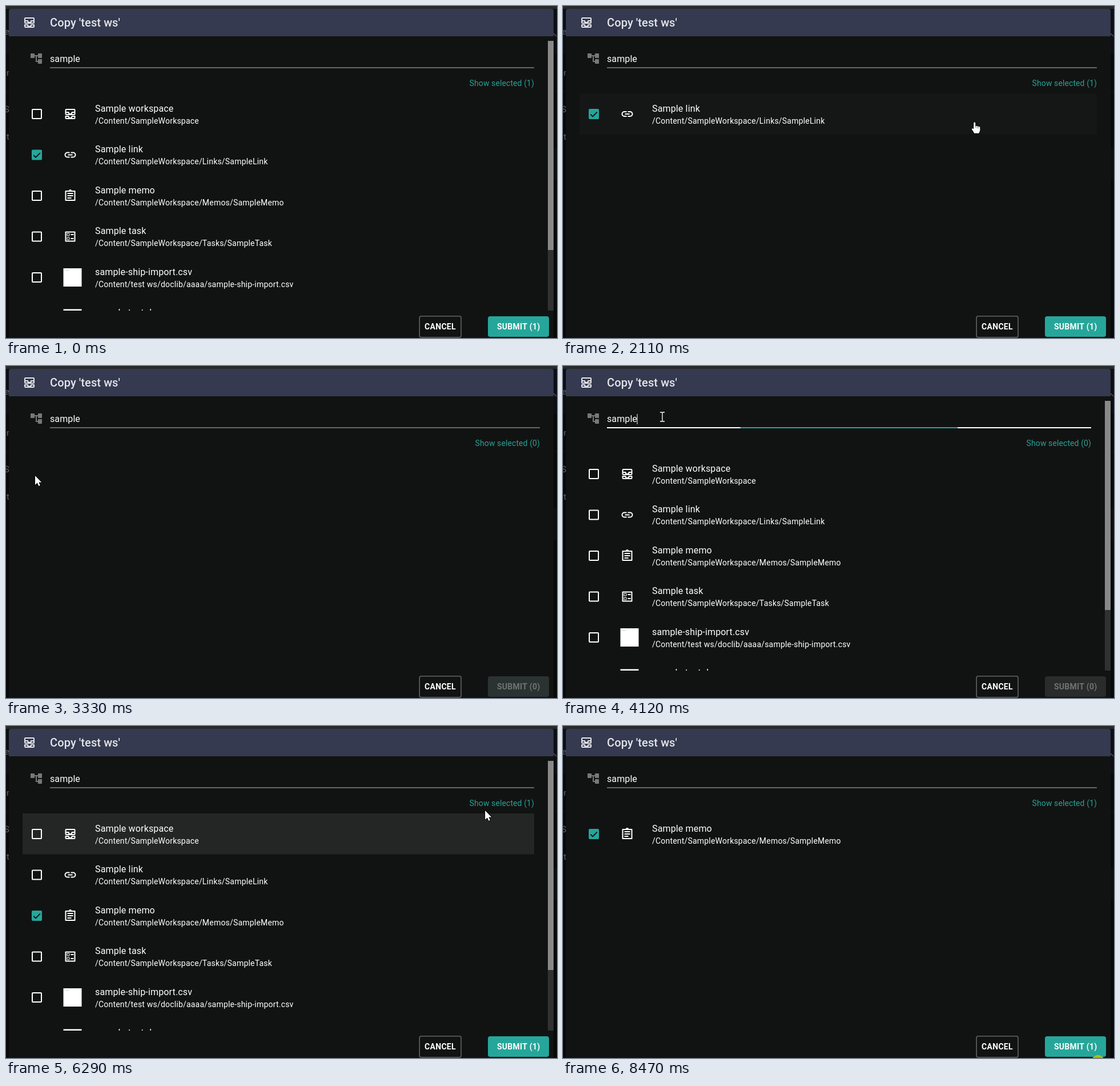
Recreate the animation shown at these times as an HTML page with a canvas. Size 965 px wide and 581 px high, loop 8540 ms.

```html
<!DOCTYPE html>
<html lang="en">
<head>
<meta charset="utf-8">
<title>Copy dialog</title>
<style>
html, body { margin: 0; width: 100%; height: 100%; overflow: hidden; background: #080909; }
canvas { display: block; }
</style>
</head>
<body>
<canvas id="stage" width="965" height="581"></canvas>
<script>
const ctx = document.getElementById('stage').getContext('2d');
const LOOP = 8540, TEAL = [38, 166, 154], GREY = [42, 44, 44], BODY = '#111312';
const ROW_TOP = 153, ROW_H = 71.5, ROW_X = 29;

const rows = [
  { icon: 'inbox', title: 'Sample workspace', path: '/Content/SampleWorkspace' },
  { icon: 'link', title: 'Sample link', path: '/Content/SampleWorkspace/Links/SampleLink' },
  { icon: 'memo', title: 'Sample memo', path: '/Content/SampleWorkspace/Memos/SampleMemo' },
  { icon: 'task', title: 'Sample task', path: '/Content/SampleWorkspace/Tasks/SampleTask' },
  { icon: 'thumb', title: 'sample-ship-import.csv', path: '/Content/test ws/doclib/aaaa/sample-ship-import.csv' },
  { icon: 'thumb', title: 'sample-test.doc', path: '' }
];
const [, LINK, MEMO] = rows;

const icons = {
  inbox: 'M5 4H19a1 1 0 0 1 1 1V12a1 1 0 0 1-1 1H5a1 1 0 0 1-1-1V5a1 1 0 0 1 1-1zM4 9H9a3 3 0 0 0 6 0H20M4 16H9a3 3 0 0 0 6 0H20V19a1 1 0 0 1-1 1H5a1 1 0 0 1-1-1z',
  link: 'M11 8H7a4 4 0 0 0 0 8h4M13 8h4a4 4 0 0 1 0 8h-4M8 12h8',
  memo: 'M4 4H20V20H4zM7 8H17M7 12H17M7 16H14M10.5 3.5a1.5 1.5 0 0 1 3 0',
  task: 'M4 4H20V20H4zM13 8.5h5M13 15.5h5'
};
const taskBoxes = 'M6.5 6.5h4v4h-4zM6.5 13.5h4v4h-4z';
const arrowShape = 'M0 0V16L3.8 12.6L6.3 18L8.8 16.9L6.4 11.6H11.3z';
const handShape = 'M-1.5 1.3Q0 -1 1.5 1.3V7Q3 6 4.5 7.4Q6 6.6 7 8Q9 7.4 9.7 9.2V14Q9 17 7.6 19.5H-.5Q-2 16.5-5 12.7Q-4.6 10-1.5 12z';

// Time, x and y of the pointer; straight moves in between.
const track = [
  [150, 942, 590], [500, 938, 330], [800, 930, 156], [920, 870, 139],
  [2020, 870, 139], [2110, 722, 203], [2450, 300, 255], [2870, 54, 192],
  [3260, 54, 192], [3330, 51, 192], [3490, 51, 192], [3710, 174, 82],
  [3860, 174, 82], [4030, 174, 89], [4580, 174, 89], [4720, 80, 300],
  [4800, 56, 355], [4870, 55, 334], [5900, 55, 334], [5990, 380, 235],
  [6060, 520, 212], [6250, 790, 160], [6290, 839, 148], [6360, 846, 140],
  [7620, 846, 140], [7760, 945, 152], [8000, 952, 400], [8240, 950, 590]
];

const clamp = v => Math.max(0, Math.min(1, v));
const span = (t, from, length) => clamp((t - from) / length);
const easeOut = p => 1 - (1 - p) ** 3;
const mix = (a, b, p) => `rgb(${a.map((v, i) => Math.round(v + (b[i] - v) * p))})`;

function pointer(t) {
  const i = track.findIndex(k => k[0] > t);
  if (i < 1) return [950, 600];
  const [t0, x0, y0] = track[i - 1], [t1, x1, y1] = track[i];
  const p = (t - t0) / (t1 - t0);
  return [x0 + (x1 - x0) * p, y0 + (y1 - y0) * p];
}

function visibleRows(t) {
  if (t < 1700) return rows;
  if (t < 3260) return [LINK];
  if (t < 4068) return [];
  return t < 7220 ? rows : [MEMO];
}

function selectedRow(t) {
  if (t < 3180) return LINK;
  return t < 5330 ? null : MEMO;
}

const rightEdge = t => visibleRows(t) === rows ? 925 : 935;

function hoveredRow(t) {
  const [x, y] = pointer(t);
  if (x < ROW_X || x > rightEdge(t) || y < ROW_TOP || y > 533) return null;
  return visibleRows(t)[Math.floor((y - ROW_TOP) / ROW_H)] || null;
}

// Highlights lag a little behind the pointer and fade in.
function hoverLevel(row, t) {
  let hits = 0;
  for (let lag = 60; lag <= 160; lag += 10) hits += hoveredRow(t - lag) === row;
  return hits / 11;
}

function rect(x, y, w, h, color) {
  ctx.fillStyle = color;
  ctx.fillRect(x, y, w, h);
}

function box(x, y, w, h, r, fill, stroke, width = 2) {
  ctx.beginPath();
  ctx.roundRect(x, y, w, h, r);
  if (fill) { ctx.fillStyle = fill; ctx.fill(); }
  if (stroke) { ctx.strokeStyle = stroke; ctx.lineWidth = width; ctx.stroke(); }
}

function disc(x, y, r, color) {
  ctx.beginPath();
  ctx.arc(x, y, r, 0, 7);
  ctx.fillStyle = color;
  ctx.fill();
}

function text(str, x, y, size, color, weight = 400, spacing = 0, align = 'left') {
  ctx.font = `${weight} ${size}px Roboto, sans-serif`;
  ctx.letterSpacing = spacing + 'px';
  ctx.textAlign = align;
  ctx.fillStyle = color;
  ctx.fillText(str, x, y);
}

function line(path, x, y, color, width = 2) {
  ctx.save();
  ctx.translate(x, y);
  ctx.strokeStyle = color;
  ctx.lineWidth = width;
  ctx.lineJoin = 'round';
  ctx.stroke(new Path2D(path));
  ctx.restore();
}

function icon(name, cx, cy, color = '#fff') {
  line(icons[name], cx - 12, cy - 12, color);
  if (name === 'task') line(taskBoxes, cx - 12, cy - 12, color, 1);
}

function drawPage() {
  rect(0, 0, 965, 581, '#080909');
  rect(0, 5, 965, 79, '#0d0e14');
  rect(0, 0, 965, 5, '#28292a');
  rect(0, 149, 965, 1, '#151616');
  rect(959, 248, 6, 57, '#0d0e0e');
  [['e', 50], ['er', 122], ['S', 186], ['t', 234]].forEach(([s, y]) => text(s, 6, y, 15, '#666', 400, 0, 'right'));
  line('M0 0L5 5', 959, 48, '#555', 1.5);
}

function drawField(t, edge) {
  ctx.fillStyle = '#777978';
  ctx.save();
  ctx.translate(41, 80);
  ctx.fill(new Path2D('M22 11V3h-7v3H9V3H2v8h7V8h2v10h4v3h7v-8h-7v3h-2V8h2v3z'));
  ctx.restore();
  text('sample', 77, 98, 16, '#fff', 400, .1);

  const active = t > 3640 && t < 4640 || t >= 4068 && t < 5218;
  if (active) rect(77, 107, edge - 77, 2, '#fff');
  else rect(77, 107.5, edge - 77, 1, '#b9baba');
  const grow = easeOut(span(t, 4067, 300)) - easeOut(span(t, 5218, 300));
  const width = (edge - 77) * grow;
  rect((77 + edge - width) / 2, 107, width, 2, mix(TEAL, TEAL, 0));
  if (t >= 4068 && t < 5218) rect(129.5, 84, 1, 18, '#fff');
}

function drawRipple(t, start, top, edge) {
  const level = span(t, start, 30) * (1 - span(t, start + 300, 190));
  if (!level) return;
  const cy = top + ROW_H / 2;
  ctx.save();
  ctx.beginPath();
  ctx.rect(ROW_X, top, edge - ROW_X, ROW_H);
  ctx.clip();
  disc(54, cy, (t - start) * 2.86, `rgba(255,255,255,${.155 * level})`);
  disc(54, cy, 20, `rgba(20,75,68,${.45 * level})`);
  ctx.restore();
}

function drawRow(row, i, t, edge) {
  const top = ROW_TOP + i * ROW_H, cy = top + 36;
  rect(ROW_X, top, edge - ROW_X, ROW_H, `rgba(255,255,255,${.08 * hoverLevel(row, t)})`);
  if (row === LINK && t < 3300) drawRipple(t, 3060, top, edge);
  if (row === MEMO && t > 5000) drawRipple(t, 5330, top, edge);

  if (row === selectedRow(t)) {
    box(45, cy - 9, 18, 18, 2, '#26a69a');
    line('M0 0L3.8 3.8L11.6 -4', 48.2, cy + .6, '#111312');
  } else {
    box(46, cy - 8, 16, 16, 1, null, '#fff');
  }
  if (row.icon === 'thumb') {
    rect(100.5, cy - 16, 32, 32, '#fff');
    rect(104, cy - 13, 6, 1, '#ccc');
  } else {
    icon(row.icon, 112.5, cy);
  }
  text(row.title, 156, top + 31.5, 16, '#fff', 400, .15);
  text(row.path, 156, top + 52.5, 14, '#fff', 400, .2);
}

function drawButtons(t, count) {
  box(724.2, 542.7, 72.8, 37, 3, null, '#626363', 1.6);
  text('CANCEL', 733, 566, 14, '#fff', 700, .3);
  const off = span(t, 3180, 160) - span(t, 5410, 290);
  box(844, 543, 107, 36, 4, mix(TEAL, GREY, off));
  text(`SUBMIT (${count})`, 860, 566, 14, count ? '#fff' : '#707373', 700, .25);
}

function drawPointer(t) {
  const [x, y] = pointer(t);
  if (y > 582) return;
  const edge = rightEdge(t);
  const overLink = x > edge - 114 && x < edge && y > 126 && y < 146;
  const overSubmit = x > 844 && x < 951 && y > 543 && y < 579;
  if (x > 77 && x < edge && y > 77 && y < 108) {
    line('M-4 -8H-1L0 -7L1 -8H4M0 -7V7M-4 8H-1L0 7L1 8H4', x, y, '#fff', 1.3);
    return;
  }
  const hand = overLink || overSubmit || hoveredRow(t);
  const shape = hand ? handShape : arrowShape;
  line(shape, x, y, '#000', 2);
  ctx.save();
  ctx.translate(x, y);
  ctx.fillStyle = '#fff';
  ctx.fill(new Path2D(shape));
  ctx.restore();
  if (hand) line('M1.5 7V10M4.5 8V11M7 8.5V11', x, y, '#333', .7);
}

function draw(t) {
  const list = visibleRows(t), edge = rightEdge(t), count = selectedRow(t) ? 1 : 0;
  drawPage();
  box(5, 5, 954, 580, 4, BODY);
  box(5, 5, 954, 48, [4, 4, 0, 0], '#353a50');
  icon('inbox', 41, 29, '#e4e5e9');
  text("Copy 'test ws'", 77, 36, 20, '#e4e5e9', 500, .1);

  drawField(t, edge);
  text(`Show selected (${count})`, edge, 140, 14, '#2aa195', 400, .1, 'right');

  ctx.save();
  ctx.beginPath();
  ctx.rect(0, 61, 965, 472);
  ctx.clip();
  list.forEach((row, i) => drawRow(row, i, t, edge));
  if (list === rows) {
    rect(949, 61, 10, 472, '#303131');
    rect(949, 61, 10, 366, '#878887');
  }
  ctx.restore();

  drawButtons(t, count);
  if (t >= 8470) disc(937, 588, 12, 'rgba(190,205,0,.85)');
  drawPointer(t);
}

const begin = performance.now();
function tick() {
  draw((performance.now() - begin) % LOOP);
  requestAnimationFrame(tick);
}
tick();
</script>
</body>
</html>
```
